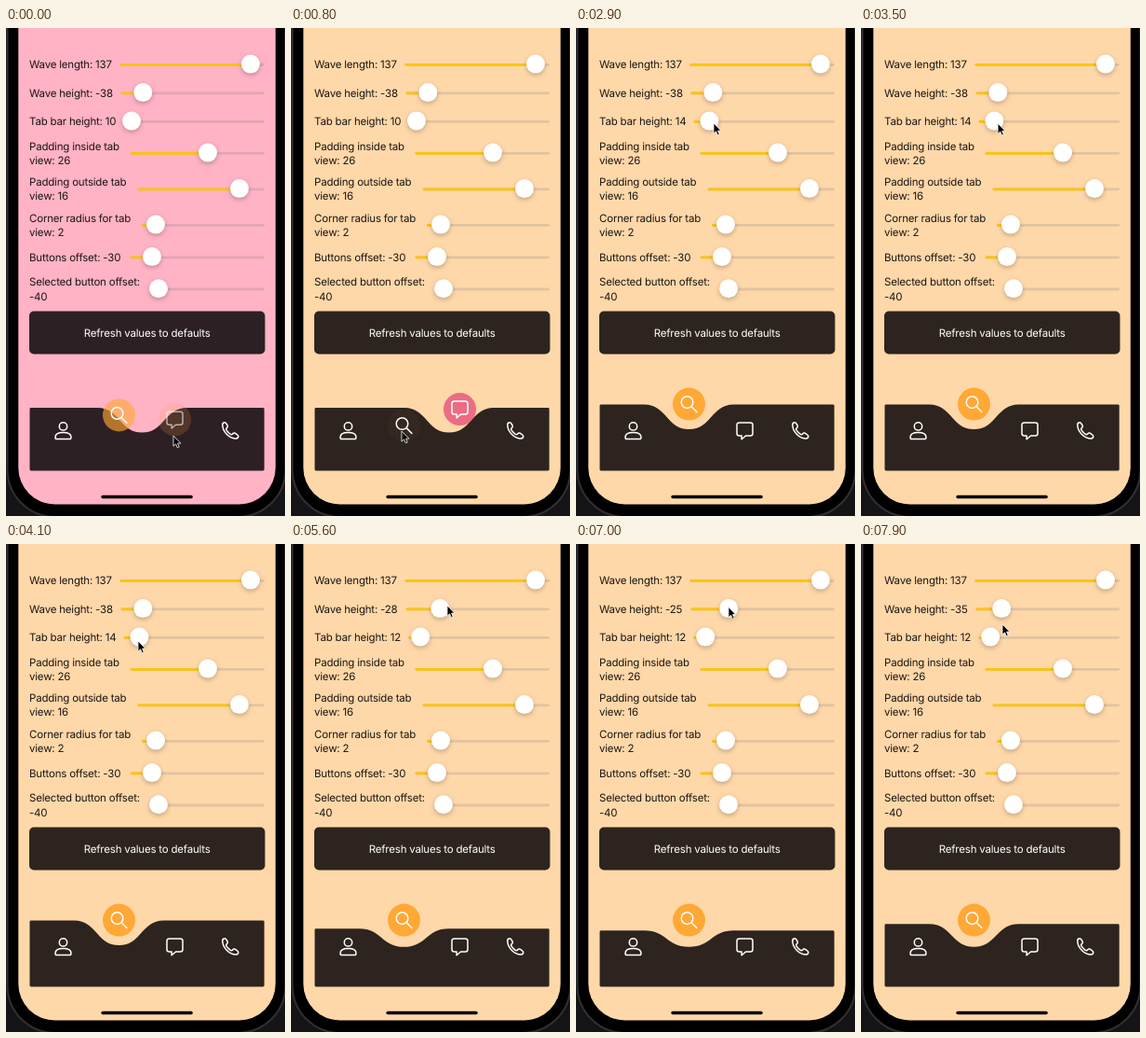
Animation, 300 px wide and 523 px high, one loop 8 s. Source, as an HTML page:

```html
<!DOCTYPE html>
<html lang="en">
<head>
<meta charset="utf-8">
<style>
html, body { margin: 0; width: 100%; height: 100%; overflow: hidden; background: #141416; }
svg { display: block; width: 100vw; height: 100vh; }
text { font: 11.5px Inter, "Open Sans", sans-serif; letter-spacing: -.2px; fill: #1d1614; text-rendering: geometricPrecision; }
.knob { fill: #fff; filter: drop-shadow(0 2px 2.5px rgba(0, 0, 0, .24)); }
.icon { fill: none; stroke: #fff; stroke-width: 1.5; stroke-linecap: round; stroke-linejoin: round; }
</style>
</head>
<body>
<svg id="stage" viewBox="0 0 300 523" xmlns="http://www.w3.org/2000/svg"></svg>
<script>
const LOOP = 8000;
const stage = document.getElementById('stage');

function add(tag, attrs, parent = stage) {
  const el = document.createElementNS('http://www.w3.org/2000/svg', tag);
  set(el, attrs);
  parent.appendChild(el);
  return el;
}
function set(el, attrs) {
  for (const k in attrs) el.setAttribute(k, attrs[k]);
}
function label(x, y, str, attrs = {}) {
  const el = add('text', { x, y, ...attrs });
  el.textContent = str;
  return el;
}

// Phone body and screen
add('rect', { x: 1.5, y: -80, width: 299, height: 604, rx: 51, fill: '#000', stroke: '#303033', 'stroke-width': 2 });
const screen = add('rect', { x: 13.3, y: -80, width: 276.5, height: 590.4, rx: 39 });
add('rect', { x: 102.3, y: 500.7, width: 98.5, height: 3.5, rx: 1.75, fill: '#000' });

// Sliders: label lines, centre y, track start, knob x
const sliders = [
  [['Wave length: 137'], 39, 122.5, 263],
  [['Wave height: -38'], 69.5, 123.5, 147.3],
  [['Tab bar height: 10'], 100, 126.5, 135],
  [['Padding inside tab', 'view: 26'], 134, 133.5, 217],
  [['Padding outside tab', 'view: 16'], 172.5, 141.5, 251],
  [['Corner radius for tab', 'view: 2'], 211, 146, 161],
  [['Buttons offset: -30'], 245.5, 133.5, 157],
  [['Selected button offset:', '-40'], 279.7, 155, 164]
].map(([lines, y, start, x]) => {
  const texts = lines.map((s, i) => label(25, y + 4.2 + (i - (lines.length - 1) / 2) * 15.2, s));
  const bar = { y: y - 1.1, height: 2.8, rx: 1.4 };
  const track = add('rect', { ...bar, fill: 'rgba(120,120,128,.22)' });
  const fill = add('rect', { ...bar, fill: '#fbc40a' });
  const knob = add('circle', { class: 'knob', cy: y - .4, r: 10 });
  const move = (from, to) => {
    set(track, { x: from, width: 278 - from });
    set(fill, { x: from, width: Math.max(0, to - from) });
    set(knob, { cx: to });
  };
  move(start, x);
  return { text: texts[0], move };
});

const button = add('rect', { x: 25, y: 303.5, width: 253.5, height: 46, rx: 5 });
label(151.7, 331, 'Refresh values to defaults', { 'text-anchor': 'middle', style: 'fill:#fff' });

// Tab bar
const tabBar = add('path', {});
const tabs = [
  [61.5, 'M-4.2-4.6a4.2 4.2 0 1 0 8.4 0a4.2 4.2 0 1 0-8.4 0M-8.5 7.2C-8.5 3.6-5 2 0 2S8.5 3.6 8.5 7.2Q8.5 9 6.8 9H-6.8Q-8.5 9-8.5 7.2Z'],
  [121.5, 'M-8.3-2a6.3 6.3 0 1 0 12.6 0a6.3 6.3 0 1 0-12.6 0M2.6 2.6L8.4 8.4'],
  [181.5, 'M-6-8.5H6Q8.5-8.5 8.5-6V3Q8.5 5.5 6 5.5H1L-3.4 9.3V5.5H-6Q-8.5 5.5-8.5 3V-6Q-8.5-8.5-6-8.5Z'],
  [241.3, 'M-8.5-6.2c0 7.5 7.5 14.7 14.5 14.7c1.6 0 2.5-1.6 2.5-2.8c0-.8-3.4-3.2-4.6-3.2c-1.2 0-1.8 1.8-2.6 1.8c-1.6 0-6-4.4-6-6c0-.9 1.8-1.5 1.8-2.7c0-1.2-2-4.3-3-4.3c-1.4 0-2.6 1.2-2.6 2.5z']
].map(([x, d]) => {
  const group = add('g', {});
  const disc = add('circle', { r: 17.5, fill: '#ffa836' }, group);
  const icon = add('path', { class: 'icon', d }, group);
  const place = (lift, alpha) => {
    set(group, { transform: `translate(${x} ${431.5 - 28.4 * lift})` });
    set(disc, { opacity: alpha });
  };
  place(0, 0);
  return { x, disc, icon, place };
});

const cursor = add('path', {
  d: 'M0 0V11.2L2.6 8.8L4.3 12.8L6.2 12L4.6 8.1H7.9Z',
  fill: '#000', stroke: '#fff', 'stroke-width': .8, 'stroke-linejoin': 'round'
});

const ease = u => .5 - .5 * Math.cos(Math.PI * Math.min(1, Math.max(0, u)));

// Eased value of a [time, ...values] key list
function at(keys, t, i = 1) {
  const n = keys.findIndex(k => k[0] > t);
  if (n < 0) return keys[keys.length - 1][i];
  if (n === 0) return keys[0][i];
  const a = keys[n - 1], b = keys[n];
  return a[i] + (b[i] - a[i]) * ease((t - a[0]) / (b[0] - a[0]));
}

const pointer = [
  [0, 180, 437], [600, 121, 433], [800, 119, 432], [1200, 119, 432], [2200, 139, 101],
  [2350, 139, 101], [2800, 148, 102], [3300, 148, 102], [4100, 142, 104], [4600, 138, 103],
  [5050, 154, 68], [5200, 154, 68], [5600, 168, 66], [6300, 176, 66], [6600, 176, 66],
  [7400, 152, 69], [7900, 152, 86]
];
const barHeight = [[2350, 10], [2800, 14], [4150, 14], [4600, 12]];
const waveHeight = [[5200, -38], [5600, -28], [6300, -15], [6600, -15], [7400, -35]];

function draw(t) {
  const pink = t < 800;
  const dark = pink ? '#2d2024' : '#2d241f';
  set(screen, { fill: pink ? '#ffb3c5' : '#ffd8a9' });
  set(button, { fill: dark });

  const height = Math.round(at(barHeight, t));
  const wave = Math.round(at(waveHeight, t));
  sliders[1].text.textContent = 'Wave height: ' + wave;
  sliders[1].move(wave > -20 ? 121.5 : 123.5, 147.3 + (wave + 38) * 1.3);
  sliders[2].text.textContent = 'Tab bar height: ' + height;
  sliders[2].move(126.5, 135 + (height - 10) * 2.1);

  // Selection goes from search to chat and back
  const toChat = t < 700;
  const p = ease(toChat ? (t + 155) / 350 : (t - 700) / 350);
  const [search, chat] = [tabs[1], tabs[2]];
  const [next, last] = toChat ? [chat, search] : [search, chat];
  next.place(p, p * p);
  last.place(1 - p, 1 - ease(p));
  const tint = 100 * ease(((toChat ? p : 1 - p) - .3) / .4);
  chat.disc.style.fill = `color-mix(in srgb, #e9637f ${tint}%, #ffa836)`;
  set(chat.icon, { opacity: Math.min(1, .6 + t / 500) });

  const c = last.x + (next.x - last.x) * p;
  const dip = 433.6 - (height - 10) * .9;
  const top = dip + wave * .7;
  set(tabBar, {
    fill: dark,
    d: `M25.5 ${top + 1.4}q0-1.4 1.4-1.4H${c - 48}C${c - 24} ${top} ${c - 24} ${dip} ${c} ${dip}` +
       `S${c + 24} ${top} ${c + 48} ${top}H276.3q1.4 0 1.4 1.4V473q0 1.4-1.4 1.4H26.9q-1.4 0-1.4-1.4Z`
  });
  set(cursor, { transform: `translate(${at(pointer, t)} ${at(pointer, t, 2)})` });
}

const begin = performance.now();
function tick() {
  draw((performance.now() - begin) % LOOP);
  requestAnimationFrame(tick);
}
tick();
</script>
</body>
</html>
```
